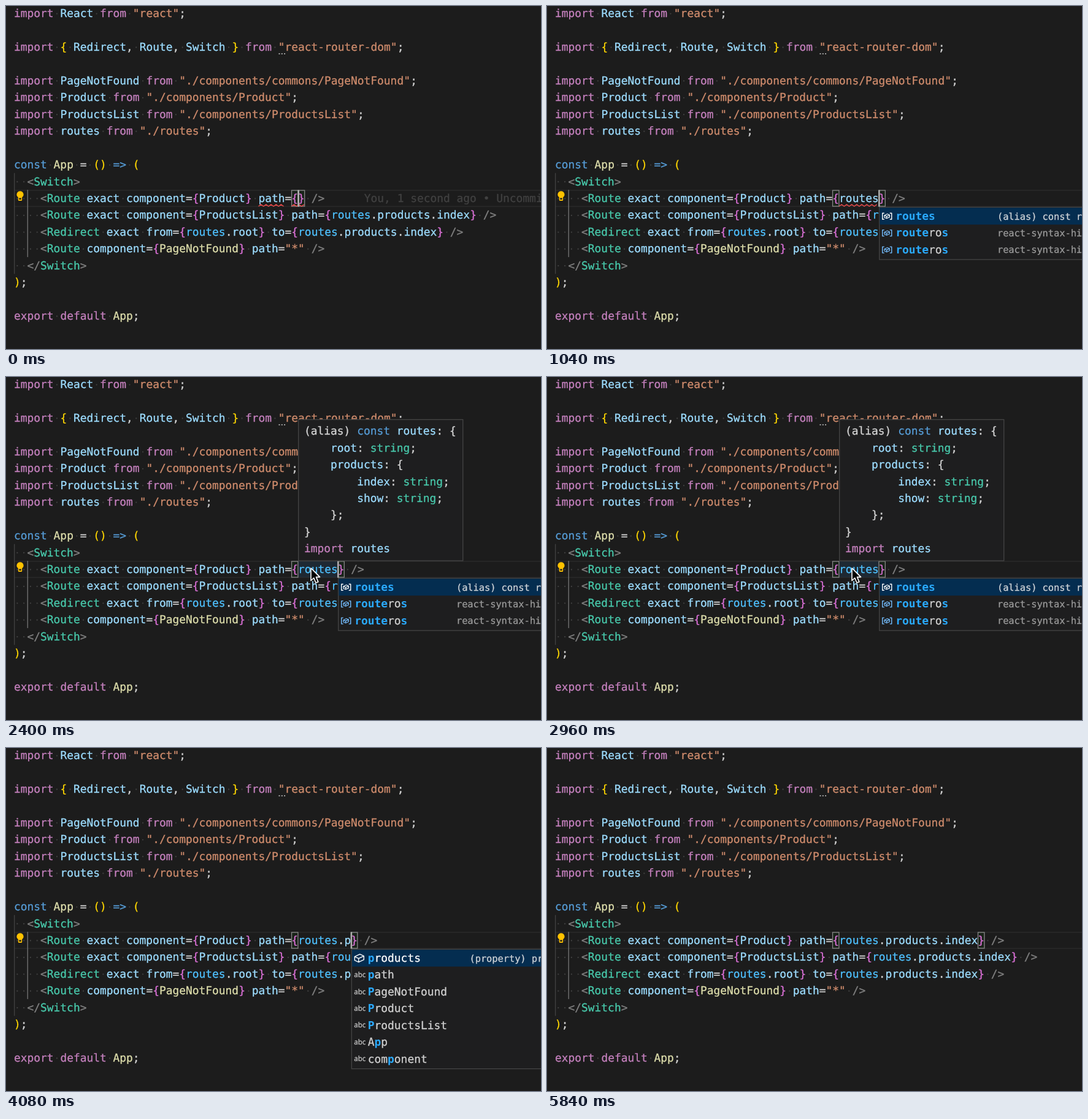
Write an HTML page that moves like this. It is 872 px wide and 560 px high and loops after 5920 ms.

```html
<!DOCTYPE html>
<html lang="en">
<head>
<meta charset="utf-8">
<title>Route autocompletion</title>
<style>
  html, body { margin: 0; width: 100%; height: 100%; overflow: hidden; background: #1c1c1c; }
  svg { display: block; width: 872px; height: 560px; }
  text {
    font: 17.89px "DejaVu Sans Mono", monospace;
    text-rendering: geometricPrecision; white-space: pre; stroke-width: .3px;
  }
  .bold { font-weight: bold; stroke-width: 0; }
  .detail { font-size: 15.3px; }
  .abc { font: 11.5px "Open Sans", sans-serif; }
</style>
</head>
<body>
<svg viewBox="0 0 872 560">
  <g id="page"></g>
  <g id="live"></g>
</svg>
<script>
const LOOP = 5920, STEP = 80;
const CHAR = 10.77, LINE = 27.44, LEFT = 13, TOP = -1.7;
const ACTIVE = 11, OPEN = 42;
const PANEL = '#1e1e1f', FRAME = 'stroke="#454545" stroke-width="1.3"';

const COLORS = {
  k: '#c580be', v: '#9cdcfe', s: '#ce8b6c', p: '#d4d4d4', b: '#569cd6', f: '#dcdcaa',
  t: '#48c9ab', g: '#808080', y: '#ffd700', m: '#da70d6', c: '#4fc1ff', x: '#414141'
};

// "~" followed by a colour key starts a new token.
const code = [
  '~kimport ~vReact ~kfrom ~s"react"~p;',
  '',
  '~kimport ~y{ ~vRedirect~p, ~vRoute~p, ~vSwitch ~y} ~kfrom ~s"react-router-dom"~p;',
  '',
  '~kimport ~vPageNotFound ~kfrom ~s"./components/commons/PageNotFound"~p;',
  '~kimport ~vProduct ~kfrom ~s"./components/Product"~p;',
  '~kimport ~vProductsList ~kfrom ~s"./components/ProductsList"~p;',
  '~kimport ~vroutes ~kfrom ~s"./routes"~p;',
  '',
  '~bconst ~fApp ~p= ~y() ~b=> ~y(',
  '~g  <~tSwitch~g>',
  '',
  '~g    <~tRoute ~vexact component~p=~m{~vProductsList~m} ~vpath~p=~m{~croutes~p.~vproducts~p.~vindex~m} ~g/>',
  '~g    <~tRedirect ~vexact from~p=~m{~croutes~p.~vroot~m} ~vto~p=~m{~croutes~p.~vproducts~p.~vindex~m} ~g/>',
  '~g    <~tRoute ~vcomponent~p=~m{~fPageNotFound~m} ~vpath~p=~s"*" ~g/>',
  '~g  </~tSwitch~g>',
  '~y)~p;',
  '',
  '~kexport default ~fApp~p;'
];

const hover = [
  '~p(alias) ~bconst ~vroutes~p: {',
  '    ~vroot~p: ~tstring~p;',
  '    ~vproducts~p: {',
  '        ~vindex~p: ~tstring~p;',
  '        ~vshow~p: ~tstring~p;',
  '~p    };',
  '~p}',
  '~kimport ~vroutes'
];

// Suggestions: label, icon kind, detail.
const words = (...labels) => labels.map(label => [label, 'abc']);
const known = ['App', 'PageNotFound', 'Product', 'ProductsList', 'React', 'Redirect', 'Route'];
const names = [
  ['routes', 'variable', '(alias) const routes'],
  ['routeros', 'variable', 'react-syntax-highlighter'],
  ['routeros', 'variable', 'react-syntax-highlighter'],
  ...words('Route', 'Router', 'Redirect', 'React', 'return', 'require', 'Range')
];
const rootMembers = [['products', 'cube', '(property) products'], ['root', 'cube'], ...words(...known)];
const pMembers = [rootMembers[0],
  ...words('path', 'PageNotFound', 'Product', 'ProductsList', 'App', 'component')];
const productMembers = [['index', 'cube'], ['show', 'cube'], ...words(...known)];

const edits = [
  [0, ''],
  ...[...'routes'].map((_, i) => [640 + i * STEP, 'routes'.slice(0, i + 1)]),
  [3280, 'routes.'], [3840, 'routes.p'], [4320, 'routes.products'],
  [4640, 'routes.products.'], [5280, 'routes.products.index']
];

const colX = col => LEFT + col * CHAR;
const lineY = n => TOP + n * LINE;
const within = (t, from, to) => t >= from && t < to;
const esc = s => s.replace(/&/g, '&amp;').replace(/</g, '&lt;');
const rect = (x, y, w, h, fill, extra = '') =>
  `<rect x="${x}" y="${y}" width="${w}" height="${h}" fill="${fill}" ${extra}/>`;
const text = (x, y, s, color, cls = '') =>
  `<text x="${x}" y="${y}" fill="${color}" stroke="${color}" class="${cls}">${esc(s)}</text>`;

function richLine(src, x, baseline, dots) {
  let out = '', col = 0;
  src.split('~').forEach((part, i) => {
    const body = i ? part.slice(1) : part;
    for (const { 0: run, index } of body.matchAll(/\S+/g))
      out += text(x + (col + index) * CHAR, baseline, run, COLORS[part[0]]);
    if (dots) for (const { index } of body.matchAll(/ /g))
      out += `<circle cx="${x + (col + index + .5) * CHAR}" cy="${baseline - 5.6}" r="1.15" fill="#404040"/>`;
    col += body.length;
  });
  return out;
}

const codeLine = (src, n) => richLine(src, LEFT, lineY(n) + 19.9, true);

function squiggle(from, to) {
  const x = colX(from), end = colX(to);
  let d = `M${x} 327`;
  for (let i = 1; x + i * 4.1 <= end; i++) d += `L${x + i * 4.1} ${i % 2 ? 324.2 : 327}`;
  return `<path d="${d}" fill="none" stroke="#f14c4c" stroke-width="1.4" stroke-linejoin="round"/>`;
}

const bracketBox = col => rect(colX(col) + .2, 301, CHAR - .4, 26, 'rgba(0,100,0,.1)', 'stroke="#888" stroke-width="1.3"');

function icon(kind, x, y, color) {
  if (kind === 'abc') return text(x, y + 3.5, 'abc', '#c5c5c5', 'abc');
  const cube = 'M1-2.5L9.5-6.5L16-3.5V2.5L7.5 6.5L1 3.5ZM1-2.5L7.5.5L16-3.5M7.5.5V6.5';
  const shape = kind === 'cube'
    ? `<path d="${cube}"/>`
    : `<path d="M4-5H1V5H4M13-5H16V5H13"/><path d="${cube}" transform="translate(3.7 0) scale(.56)" stroke-width="2.1"/>`;
  return `<g transform="translate(${x} ${y})" fill="none" stroke="${color}" stroke-width="1.4" stroke-linejoin="round">${shape}</g>`;
}

// Indices of the label letters that match the query in order, or null.
function matchLetters(label, query) {
  const hits = [];
  let from = 0;
  for (const ch of query) {
    const at = label.toLowerCase().indexOf(ch, from);
    if (at < 0) return null;
    hits.push(at);
    from = at + 1;
  }
  return hits;
}

function suggestBox(items, query, col) {
  const rows = items.filter(([label]) => matchLetters(label, query));
  const x = Math.min(colX(col) + 1, 624.5), y = 329;
  let out = rect(x, y - .4, 600, rows.length * LINE + 3, PANEL, FRAME);
  out += rect(x + .7, y + .4, 600, LINE, '#042d50');
  rows.forEach(([label, kind, detail], i) => {
    const base = y + i * LINE + 20, hits = matchLetters(label, query);
    out += icon(kind, x + 4, base - 5.8, i ? '#75beff' : '#fff');
    [...label].forEach((ch, j) => {
      const hit = hits.includes(j);
      out += text(x + 26.5 + j * CHAR, base, ch, hit ? '#2aaaff' : i ? '#d0d0d0' : '#fff', hit ? 'bold' : '');
    });
    if (detail) out += text(x + 192.2, base - .4, detail, i ? '#9a9a9a' : '#d0d4d8', 'detail');
  });
  return out;
}

function hoverBox() {
  return rect(476.7, 69.5, 268, 230.5, PANEL, FRAME) +
    hover.map((src, i) => richLine(src, 486, 94.2 + i * LINE)).join('');
}

function pointer(t) {
  const left = 1 - Math.min(1, (t - 1840) / 240), ease = left ** 3;
  return `<path transform="translate(${497 + 60 * ease} ${312 + 100 * ease})"
    d="M0 0V20.5L4.7 16L8 24L11.8 22.4L8.5 14.6H14.6Z" fill="#000" stroke="#fff" stroke-width="1.6" stroke-linejoin="round"/>`;
}

function drawPage() {
  const guide = (x, from, to, color) => rect(x, lineY(from), 1.4, (to - from) * LINE, color);
  const hint = [0, 1, 2].map(i => rect(444.5 + i * 4.3, 77, 2, 2, '#a0a0a0')).join('');
  const bulb = `<path d="M23 302.3a5.5 5.5 0 0 1 3.2 10V316.5q0 1.6-1.6 1.6h-3.2q-1.6 0-1.6-1.6V312.3a5.5 5.5 0 0 1 3.2-10Z" fill="#ffc200"/>
    <path d="M21.3 313.5h3.4v2.6h-3.4z" fill="#1c1c1c"/>`;
  return rect(LEFT, 300, 872, 1.8, '#282828') + rect(LEFT, 326.4, 872, 1.8, '#282828') +
    guide(13, 10, 16, '#404040') + guide(34.6, 11, 15, '#707070') +
    code.map(codeLine).join('') + hint + bulb;
}

function drawLive(t) {
  const [since, typed] = edits.filter(([at]) => at <= t).pop();
  const col = OPEN + 1 + typed.length;
  const [head, ...rest] = typed.split('.');
  const expr = `~${t < 1520 ? 'v' : 'c'}${head}` + rest.map(part => `~p.~v${part}`).join('');
  const hovering = within(t, 2240, 3280);

  let out = hovering ? rect(colX(43), 301, 6 * CHAR, 26, 'rgba(38,79,120,.25)') : '';
  out += bracketBox(OPEN) + bracketBox(col);
  out += codeLine(`~g    <~tRoute ~vexact component~p=~m{~vProduct~m} ~vpath~p=~m{${expr}~m} ~g/>`, ACTIVE);

  if (t < 640) {
    out += richLine('~xYou, 1 second ago • Uncommitted changes', colX(53), lineY(ACTIVE) + 19.9);
    out += squiggle(37, 41) + squiggle(42, 44);
  }
  if (within(t, 640, 1520)) out += squiggle(43, col);
  if (within(t, 3280, 3840)) out += squiggle(43, 49);
  if (within(t, 4640, 5280)) out += squiggle(50, 58);

  if (Math.floor((t - since) / 500) % 2 === 0) out += rect(colX(col) - .6, 300.5, 2.5, 27, '#aeafad');

  if (within(t, 720, 3280)) out += suggestBox(names, typed, col);
  if (within(t, 3280, 3840)) out += suggestBox(rootMembers, '', col);
  if (within(t, 3840, 4320)) out += suggestBox(pMembers, 'p', col);
  if (within(t, 4720, 5280)) out += suggestBox(productMembers, '', col);

  if (hovering) out += hoverBox();
  if (within(t, 1840, 3280)) out += pointer(t);
  return out;
}

const live = document.getElementById('live');
document.getElementById('page').innerHTML = drawPage();

let start, shown;
function tick(now) {
  start ??= now;
  const t = Math.floor((now - start) % LOOP / STEP) * STEP;
  if (t !== shown) live.innerHTML = drawLive(shown = t);
  requestAnimationFrame(tick);
}
live.innerHTML = drawLive(0);
requestAnimationFrame(tick);
</script>
</body>
</html>
```
